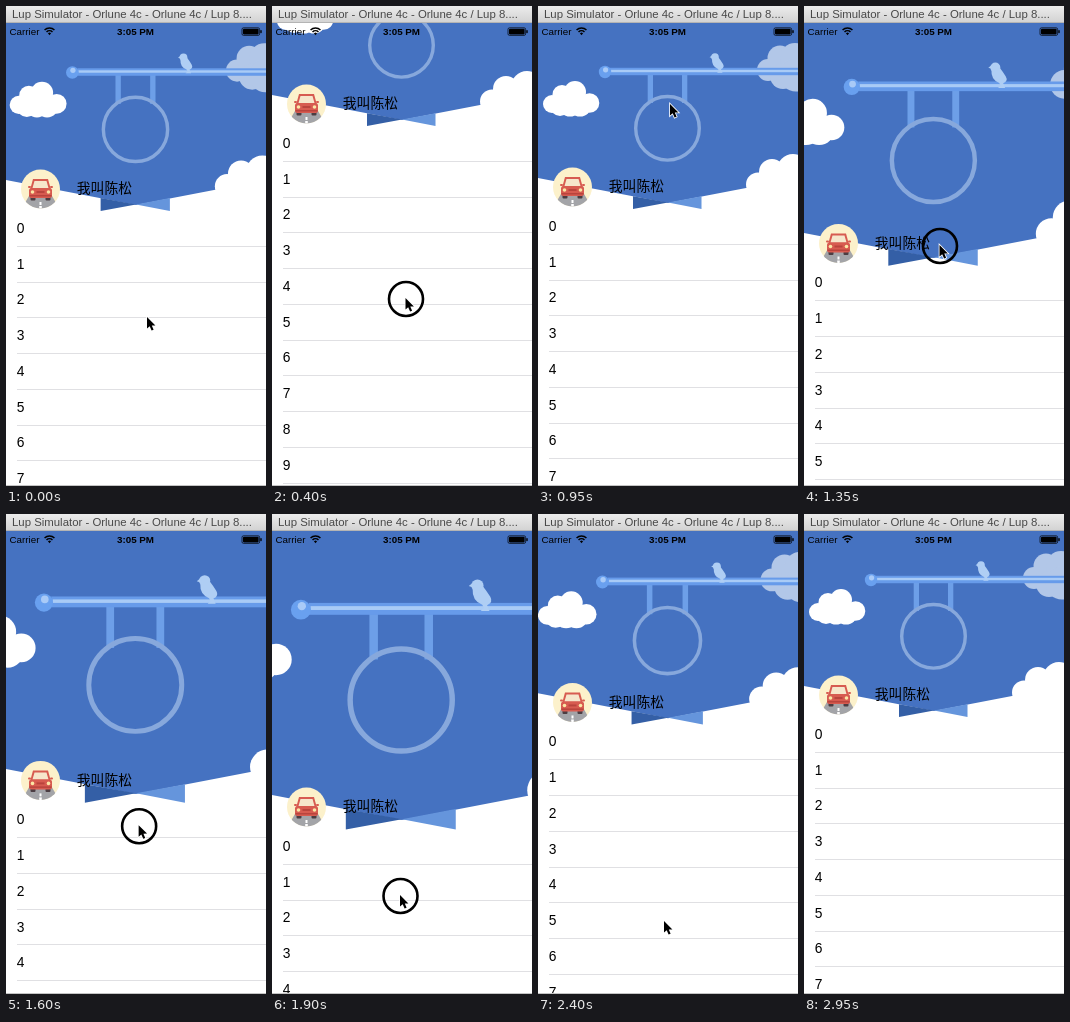
Animation of 260x480 px, one loop 3 s. Source, as an HTML page with a canvas:

```html
<!DOCTYPE html>
<html lang="en">
<head>
<meta charset="utf-8">
<title>Stretchy header</title>
<style>
html, body { margin: 0; width: 100%; height: 100%; overflow: hidden; background: #fff; }
canvas { display: block; width: 260px; height: 480px; }
</style>
</head>
<body>
<canvas id="stage"></canvas>
<script>
const W = 260, H = 480, LOOP = 3000, STEP = 50;
const TOP = 17, HEAD = 185, ROW = 35.75, RELEASE = 2050;
const SANS = '"Liberation Sans", Arial, sans-serif';
const CJK = '"Noto Sans CJK SC", "Noto Sans CJK", sans-serif';

const canvas = document.getElementById('stage');
const ctx = canvas.getContext('2d');
const dpr = window.devicePixelRatio || 1;
canvas.width = W * dpr;
canvas.height = H * dpr;

// [time, value] keys
const scrollKeys = [[0, 2], [100, 0], [300, -110], [400, -83], [520, -30], [620, 5], [750, 1.5],
  [950, 0], [1000, 0], [1350, 56.5], [1900, 112], [RELEASE, 120]];
const cursorX = [[0, 141], [100, 138], [400, 133.5], [950, 132], [1350, 135.5], [1900, 128], [2400, 126], [2800, 124]];
const cursorY = [[0, 311], [100, 375], [300, 265], [400, 292], [520, 340], [950, 98], [1000, 98],
  [1350, 239], [1900, 381], [RELEASE, 406], [2400, 407], [2600, 405], [2800, 387]];

// Monotone cubic interpolation
function track(keys, t) {
  const n = keys.length;
  if (t <= keys[0][0]) return keys[0][1];
  if (t >= keys[n - 1][0]) return keys[n - 1][1];
  const slope = i => (keys[i + 1][1] - keys[i][1]) / (keys[i + 1][0] - keys[i][0]);
  const tangent = i => {
    if (i === 0) return slope(0);
    if (i === n - 1) return slope(n - 2);
    const a = slope(i - 1), b = slope(i);
    return a * b <= 0 ? 0 : 2 * a * b / (a + b);
  };
  let i = 0;
  while (t >= keys[i + 1][0]) i++;
  const h = keys[i + 1][0] - keys[i][0], u = (t - keys[i][0]) / h;
  const v = 1 - u;
  return keys[i][1] * (1 + 2 * u) * v * v + keys[i + 1][1] * u * u * (3 - 2 * u)
    + h * (tangent(i) * u * v * v - tangent(i + 1) * u * u * v);
}

function scrollAt(t) {
  if (t < RELEASE) return track(scrollKeys, t);
  const k = (t - RELEASE) * 0.0128;
  return 120 * (1 + k) * Math.exp(-k);
}

function rect(x, y, w, h, color) {
  ctx.fillStyle = color;
  ctx.fillRect(x, y, w, h);
}

function disc(x, y, r, color) {
  ctx.fillStyle = color;
  ctx.beginPath();
  ctx.arc(x, y, r, 0, 7);
  ctx.fill();
}

function ring(x, y, r, width, color) {
  ctx.strokeStyle = color;
  ctx.lineWidth = width;
  ctx.beginPath();
  ctx.arc(x, y, r, 0, 7);
  ctx.stroke();
}

function poly(points, color) {
  ctx.fillStyle = color;
  ctx.beginPath();
  points.forEach(([x, y]) => ctx.lineTo(x, y));
  ctx.closePath();
  ctx.fill();
}

function round(x, y, w, h, r, color) {
  ctx.fillStyle = color;
  ctx.beginPath();
  ctx.roundRect(x, y, w, h, r);
  ctx.fill();
}

function label(text, x, y, font, color = '#000', align = 'left') {
  ctx.font = font;
  ctx.fillStyle = color;
  ctx.textAlign = align;
  ctx.fillText(text, x, y);
}

const cloud = (lobes, color) => lobes.forEach(([x, y, r]) => disc(x, y, r, color));

function bird() {
  ctx.fillStyle = '#afcef4';
  ctx.beginPath();
  ctx.arc(177, 51, 3.8, 0, 7);
  ctx.fill();
  poly([[171.6, 51.3], [174.5, 49], [175, 52.5]], '#afcef4');
  ctx.beginPath();
  ctx.moveTo(174, 53);
  ctx.quadraticCurveTo(173.5, 60.5, 180, 63);
  ctx.lineTo(181, 65);
  ctx.lineTo(179, 66.8);
  ctx.lineTo(184.5, 66.8);
  ctx.lineTo(183, 63.2);
  ctx.quadraticCurveTo(187, 61.5, 185, 58);
  ctx.quadraticCurveTo(182.5, 54, 180.5, 51.5);
  ctx.fill();
}

function header(d) {
  const s = Math.max(1, 1 + d / HEAD);
  ctx.save();
  ctx.beginPath();
  ctx.rect(0, TOP, W, H);
  ctx.clip();
  ctx.translate(130, TOP + Math.min(0, d));
  ctx.scale(s, s);
  ctx.translate(-130, -TOP);

  poly([[0, TOP], [W, TOP], [W, 172], [130, 197], [0, 172]], '#4572c1');
  poly([[95, 190.2], [130, 196.5], [95, 203]], '#345fa6');
  poly([[163.5, 190.2], [130, 196.5], [163.5, 203]], '#6595dc');

  cloud([[14, 98, 9], [24, 88.5, 9.5], [37, 86, 11], [51.5, 97, 9.8], [22, 100, 10],
    [32, 99, 11.5], [42, 99, 11.5]], '#fff');
  cloud([[230, 64, 11], [242, 52, 12.5], [257, 52, 15], [245, 70, 13], [258, 69, 16.5]], '#b2c7e8');
  cloud([[220, 178.5, 12], [234, 166, 13], [255, 164, 16], [240, 184, 18], [257, 182, 18]], '#fff');

  rect(109.7, 68, 5.3, 29, '#6d9fe8');
  rect(144, 68, 5.3, 29, '#6d9fe8');
  ring(129.5, 122.3, 31.8, 3.4, '#87a8dc');
  rect(72, 61.8, 190, 7.4, '#679bea');
  rect(73, 63.8, 190, 2.4, '#a9cbf6');
  disc(67, 66, 6.2, '#69a0ef');
  disc(67.6, 63.8, 2.6, '#a9caf7');
  bird();
  ctx.restore();
}

function avatar(x, y) {
  ctx.save();
  ctx.translate(x, y);
  ctx.beginPath();
  ctx.arc(0, 0, 19.5, 0, 7);
  ctx.clip();
  rect(-20, -20, 40, 40, '#fcf1cb');
  poly([[-11, 6], [11, 6], [19, 20], [-19, 20]], '#a3a4a8');
  rect(-1, 13, 2, 3, '#fff');
  rect(-1.3, 17, 2.6, 4, '#fff');
  round(-10, 6, 5, 5.5, 1, '#4b3d42');
  round(5, 6, 5, 5.5, 1, '#4b3d42');
  poly([[-7.5, -10], [7.5, -10], [10.5, 1], [-10.5, 1]], '#d75b50');
  poly([[-6, -8], [6, -8], [8, -1], [-8, -1]], '#f6e6cb');
  round(-12.5, -3, 3, 2, 1, '#d75b50');
  round(9.5, -3, 3, 2, 1, '#d75b50');
  round(-11.5, -1, 23, 10, 2.5, '#d75b50');
  disc(-8, 3, 1.8, '#fbe6a5');
  disc(8, 3, 1.8, '#fbe6a5');
  rect(-4, 2, 8, 2, '#b9443d');
  rect(-11, 6, 22, 1.5, '#b9443d');
  ctx.restore();
}

function table(d) {
  for (let i = 0; i < 14; i++) {
    const y = 220 + d + ROW * i;
    label(String(i), 10.8, y + 4.9, '13.8px ' + SANS);
    rect(11, Math.round(y + 17.8), W, 1, '#e0e0e3');
  }
  avatar(34.5, 181 + d);
  label('我叫陈松', 70.8, 185.2 + d, '13.8px ' + CJK);
}

function statusBar() {
  label('Carrier', 3.5, 28.8, '9.8px ' + SANS);
  label('3:05 PM', 129.5, 28.8, 'bold 9.8px ' + SANS, '#000', 'center');
  ctx.strokeStyle = '#000';
  ctx.lineWidth = 1.5;
  [4.2, 7].forEach(r => {
    ctx.beginPath();
    ctx.arc(43.5, 29, r, -Math.PI * 0.75, -Math.PI * 0.25);
    ctx.stroke();
  });
  poly([[41.9, 27.3], [43.5, 26.6], [45.1, 27.3], [43.5, 29.2]], '#000');
  ctx.lineWidth = 0.7;
  ctx.beginPath();
  ctx.roundRect(236, 21.8, 17.6, 7.6, 1.5);
  ctx.stroke();
  round(237, 22.8, 15.6, 5.6, 0.8, '#000');
  round(254.3, 24, 1.4, 3.2, 0.7, '#000');
}

function titleBar() {
  const g = ctx.createLinearGradient(0, 0, 0, 16);
  g.addColorStop(0, '#ececec');
  g.addColorStop(1, '#d3d3d3');
  rect(0, 0, W, 16, g);
  rect(0, 16, W, 1, '#b4b4b4');
  label('Lup Simulator - Orlune 4c - Orlune 4c / Lup 8....', 6, 12.4, '11.4px ' + SANS, '#484848');
}

function cursor(t) {
  if (t >= 2850) return;
  const x = track(cursorX, t), y = track(cursorY, t);
  const pressed = (t >= 100 && t < 520) || (t >= 1000 && t < RELEASE);
  if (pressed) ring(x + 0.5, y + 1, 17, 2.6, '#000');
  ctx.save();
  ctx.translate(x, y);
  ctx.lineWidth = 1.6;
  ctx.strokeStyle = '#fff';
  ctx.fillStyle = '#000';
  ctx.beginPath();
  [[0, 0], [0, 11.6], [2.7, 9.2], [4.6, 13.6], [6.6, 12.7], [4.8, 8.5], [8.4, 8.4]]
    .forEach(([a, b]) => ctx.lineTo(a, b));
  ctx.closePath();
  ctx.stroke();
  ctx.fill();
  ctx.restore();
}

function draw(t) {
  const d = scrollAt(t);
  ctx.setTransform(dpr, 0, 0, dpr, 0, 0);
  rect(0, 0, W, H, '#fff');
  header(d);
  table(d);
  statusBar();
  titleBar();
  rect(0, 479, W, 1, '#c4c4c4');
  cursor(t);
}

const start = performance.now();
function tick() {
  const t = (performance.now() - start) % LOOP;
  draw(Math.floor(t / STEP) * STEP);
  requestAnimationFrame(tick);
}
tick();
</script>
</body>
</html>
```
